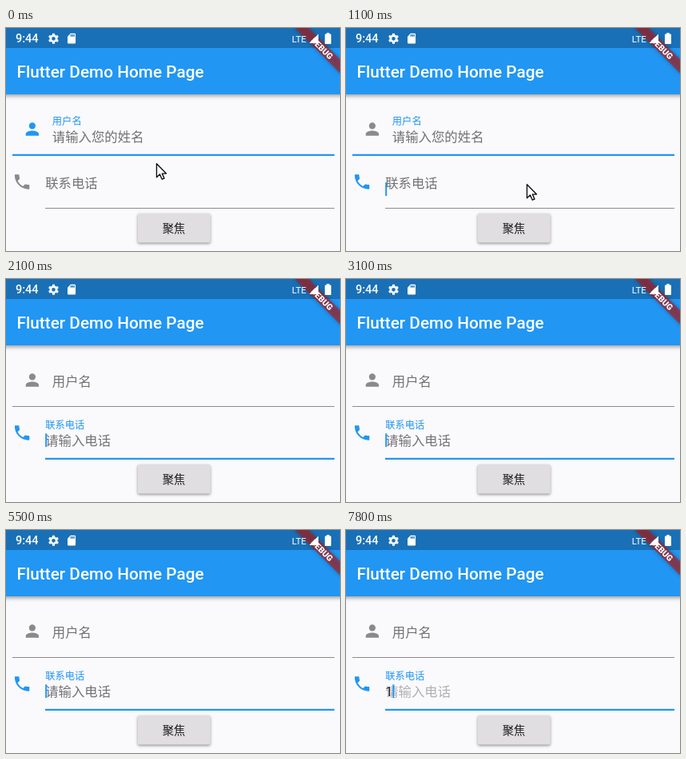
Write an HTML page with a canvas that moves like this. It is 418 px wide and 279 px high and loops after 8000 ms.

```html
<!DOCTYPE html>
<html lang="zh-CN">
<head>
<meta charset="utf-8">
<title>Focus demo</title>
<style>
  html, body { margin: 0; width: 100%; height: 100%; overflow: hidden; background: #faf9fb; }
  canvas { display: block; width: 418px; height: 279px; }
</style>
</head>
<body>
<canvas id="stage"></canvas>
<script>
const W = 418, H = 279, LOOP = 8000, STEP = 100;
const SCALE = 1.025; // logical pixels to stage pixels
const BLUE = [33, 150, 243], GREY = [115, 113, 116], LINE = [140, 138, 141], ICON = [138, 137, 139];
const FONT = 'Roboto, "Noto Sans CJK SC", "Noto Sans CJK", sans-serif';

const PERSON = new Path2D('M12 12c2.21 0 4-1.79 4-4s-1.79-4-4-4-4 1.79-4 4 1.79 4 4 4z' +
  'm0 2c-2.67 0-8 1.34-8 4v2h16v-2c0-2.66-5.33-4-8-4z');
const PHONE = new Path2D('M6.62 10.79c1.44 2.83 3.76 5.14 6.59 6.59l2.2-2.2c.27-.27.67-.36 1.02-.24 ' +
  '1.12.37 2.33.57 3.57.57.55 0 1 .45 1 1V20c0 .55-.45 1-1 1-9.39 0-17-7.61-17-17 0-.55.45-1 1-1h3.5' +
  'c.55 0 1 .45 1 1 0 1.25.2 2.45.57 3.57.11.35.03.74-.25 1.02l-2.2 2.2z');
const CARD = new Path2D('M18 2h-8L4.02 8 4 20c0 1.1.9 2 2 2h12c1.1 0 2-.9 2-2V4c0-1.1-.9-2-2-2z' +
  'm-6 6h-2V4h2v4zm3 0h-2V4h2v4zm3 0h-2V4h2v4z');
const ARROW = new Path2D('M0 0V17L4 13.3 6.8 19.4 9.5 18.2 6.9 12.3H12Z');

// Pointer path: time, x, y
const POINTER = [
  [0, 188, 169], [100, 222, 92], [200, 262, 122], [300, 258, 165], [400, 249, 195],
  [600, 238, 195], [700, 226, 195], [1300, 222, 199], [1400, 218, 202],
  [1500, 213, 208], [1600, 208, 214], [1800]
];
const NAME_CARET = [100, 600];
const PHONE_CARET = [1100, 1600, 2100, 4200, 4300, 5000, 5500, 6000, 6500, 7000, 7600];
const TAP = 1100, TYPED = 7700;

const canvas = document.getElementById('stage');
const ctx = canvas.getContext('2d');
const dpr = window.devicePixelRatio || 1;
canvas.width = W * dpr;
canvas.height = H * dpr;

const lerp = (a, b, p) => a + (b - a) * p;
const rgb = c => `rgb(${c.join()})`;
const mix = (a, b, p) => rgb(a.map((v, i) => Math.round(lerp(v, b[i], p))));
// A toggle list starts off and flips at each time
const isOn = (times, t) => times.filter(s => s <= t).length % 2 === 1;

function rect(x, y, w, h, color) {
  ctx.fillStyle = color;
  ctx.fillRect(x, y, w, h);
}

function text(str, x, y, size, color, weight = 400, align = 'left') {
  ctx.font = `${weight} ${size}px ${FONT}`;
  ctx.textAlign = align;
  ctx.fillStyle = color;
  ctx.fillText(str, x, y);
}

function icon(path, x, y, scale, color) {
  ctx.save();
  ctx.translate(x, y);
  ctx.scale(scale, scale);
  ctx.fillStyle = color;
  ctx.fill(path);
  ctx.restore();
}

function shadow(color, blur, dy) {
  ctx.shadowColor = color;
  ctx.shadowBlur = blur * dpr;
  ctx.shadowOffsetY = dy * dpr;
}

function appBar() {
  ctx.save();
  shadow('rgba(0,0,0,.38)', 5, 2);
  rect(-10, 25, W + 20, 58, rgb(BLUE));
  ctx.restore();
  rect(0, 0, W, 25, '#1970b6');
  text('Flutter Demo Home Page', 13.5, 62.3, 20.8, '#fff', 500);
}

function banner() {
  ctx.save();
  ctx.translate(419.5, 0);
  ctx.rotate(Math.PI / 4);
  ctx.scale(SCALE, SCALE);
  ctx.save();
  shadow('rgba(0,0,0,.45)', 5, 0);
  rect(-40, 28, 80, 12, 'rgba(183,28,28,.63)');
  ctx.restore();
  text('DEBUG', 1, 37.7, 10.2, '#fff', 900, 'center');
  ctx.restore();
}

function gear(x, y) {
  ctx.save();
  ctx.translate(x, y);
  ctx.strokeStyle = '#fff';
  ctx.lineWidth = 2.7;
  ctx.beginPath();
  ctx.arc(0, 0, 3.7, 0, Math.PI * 2);
  ctx.stroke();
  ctx.lineWidth = 3;
  for (let i = 0; i < 6; i++) {
    ctx.beginPath();
    ctx.moveTo(0, -4.2);
    ctx.lineTo(0, -6.5);
    ctx.stroke();
    ctx.rotate(Math.PI / 3);
  }
  ctx.restore();
}

function statusIcons() {
  text('9:44', 12, 18.4, 14.5, '#fff', 500);
  gear(59.5, 13.3);
  icon(CARD, 74.5, 5.6, 0.63, '#fff');
  text('LTE', 357.8, 17.8, 11.5, '#fff');
  ctx.fillStyle = '#fff';
  ctx.beginPath();
  ctx.moveTo(379.5, 19);
  ctx.lineTo(391, 19);
  ctx.lineTo(391, 7.5);
  ctx.fill();
  ctx.beginPath();
  ctx.roundRect(399, 7.5, 8, 12.5, 1);
  ctx.rect(401.3, 6, 3.4, 2);
  ctx.fill();
}

// Input field; p runs from resting (0) to focused (1)
function field(f, p, hintAlpha) {
  const size = lerp(16.4, 12.3, p);
  text(f.label, f.x, lerp(f.y + 6.2, f.y - 7.3, p), size, mix(GREY, BLUE, p));
  ctx.globalAlpha = p * hintAlpha;
  text(f.hint, f.x, f.y + 14.2, 16.4, rgb(GREY));
  ctx.globalAlpha = 1;
  const thick = 1 + 1.2 * p;
  rect(f.lineX, f.y + 32 - thick, 411 - f.lineX, thick, mix(LINE, BLUE, p > 0 ? 1 : 0));
}

function caret(x, y) {
  rect(x, y, 2, 16.8, rgb(BLUE));
}

function button() {
  ctx.save();
  shadow('rgba(0,0,0,.4)', 3.5, 1.5);
  ctx.fillStyle = '#e0dee1';
  ctx.beginPath();
  ctx.roundRect(164.8, 232, 91, 36.6, 2);
  ctx.fill();
  ctx.restore();
  text('聚焦', 210, 255.8, 14.35, '#212121', 400, 'center');
}

function pointer(t) {
  const [, x, y] = POINTER.filter(k => k[0] <= t).pop();
  if (x === undefined) return;
  ctx.save();
  ctx.translate(x + 0.5, y + 0.8);
  ctx.lineWidth = 1.4;
  ctx.lineJoin = 'round';
  ctx.strokeStyle = '#111';
  ctx.fillStyle = '#fff';
  ctx.fill(ARROW);
  ctx.stroke(ARROW);
  ctx.restore();
}

const nameField = { label: '用户名', hint: '请输入您的姓名', x: 57.8, y: 128, lineX: 8 };
const phoneField = { label: '联系电话', hint: '请输入电话', x: 49.2, y: 194, lineX: 49 };

function draw(t) {
  ctx.setTransform(dpr, 0, 0, dpr, 0, 0);
  rect(0, 0, W, H, '#faf9fb');
  appBar();

  const onPhone = t >= TAP;
  const typed = t >= TYPED;
  const p = t < 1300 ? 0 : t < 1400 ? 0.75 : 1;
  const hintAlpha = !typed ? 1 : t < TYPED + STEP ? 0.8 : 0.55;

  icon(PERSON, 20.6, 114.2, SCALE, rgb(onPhone ? ICON : BLUE));
  icon(PHONE, 7.8, 180.2, SCALE, rgb(onPhone ? BLUE : ICON));
  field(nameField, 1 - p, 1);
  field(phoneField, p, hintAlpha);
  if (typed) text('1', 49.2, 208, 16.4, '#212121');
  if (isOn(NAME_CARET, t)) caret(57.8, 127.6);
  if (isOn(PHONE_CARET, t)) caret(typed ? 58.3 : 49.2, 193.3);

  button();
  banner();
  statusIcons();
  pointer(t);
}

const start = performance.now();
function tick() {
  const t = (performance.now() - start) % LOOP;
  draw(Math.floor(t / STEP) * STEP);
  requestAnimationFrame(tick);
}
tick();
</script>
</body>
</html>
```
